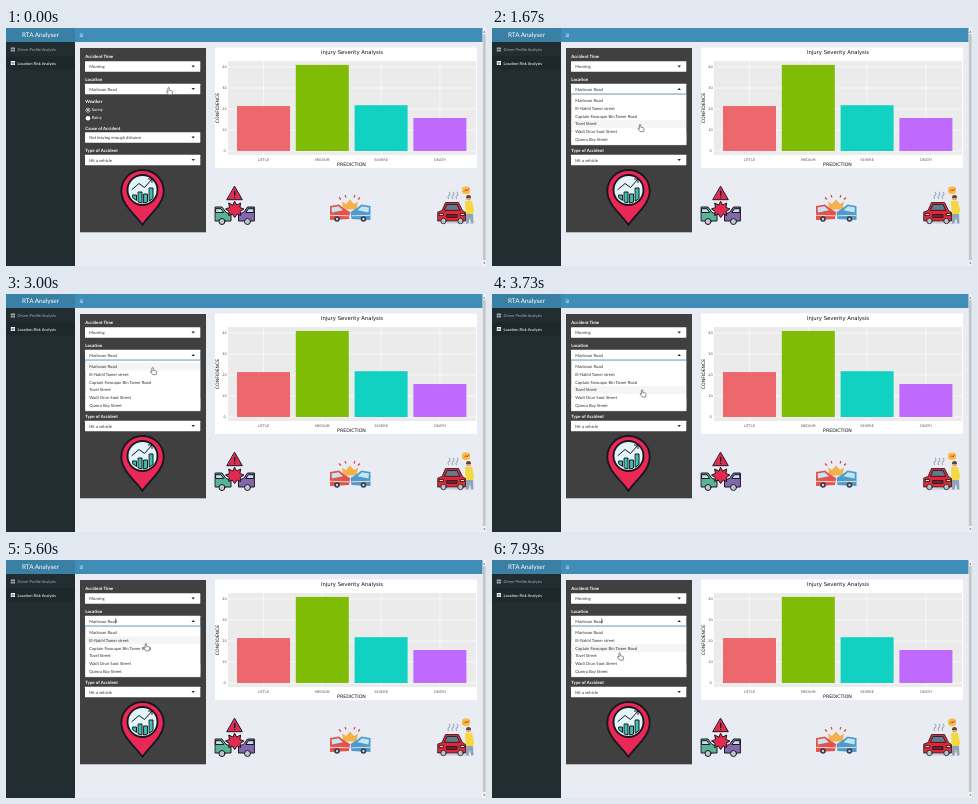
Write an HTML page that moves like this. It is 480 px wide and 238 px high and loops after 8000 ms.

```html
<!DOCTYPE html>
<html lang="en">
<head>
<meta charset="utf-8">
<title>RTA Analyser</title>
<style>
  html, body { margin: 0; width: 100%; height: 100%; overflow: hidden; background: #e9edf3; }
  svg { display: block; }
  text { font: 4.2px Lato, sans-serif; fill: #333; dominant-baseline: central; text-rendering: geometricPrecision; }
  .label { font-size: 4.4px; font-weight: bold; fill: #fff; }
  .side { font-size: 4px; }
  .chart text { font-family: "DejaVu Sans", sans-serif; text-anchor: middle; fill: #111; }
  .chart .tick { font-size: 3.5px; fill: #555; }
  .ink { stroke: #1a1720; stroke-width: 1; stroke-linejoin: round; stroke-linecap: round; }
  .bold { stroke-width: 1.9; }
</style>
</head>
<body>
<svg id="stage" width="480" height="238" viewBox="0 0 480 238">
  <!-- page frame -->
  <rect width="69" height="238" fill="#222d32"/>
  <rect width="69" height="14" fill="#3a80a5"/>
  <rect x="69" width="411" height="14" fill="#408eb8"/>
  <rect y="28" width="69" height="13.5" fill="#1e282c"/>
  <text x="34.5" y="7.2" text-anchor="middle" style="font-size:6.4px;fill:#fff">RTA Analyser</text>
  <path d="M73.800 6h3.200M73.800 7.300h3.200M73.800 8.600h3.200" stroke="#d5e6f0" stroke-width=".6"/>
  <path d="M4.800 19.500h4.200v4H4.800z" fill="#a3b2b8"/>
  <path d="M4.800 33h4.200v4H4.800z" fill="#fff"/>
  <path d="M4.800 21.500h4.200M6.900 20.200v3.300M4.800 35h4.200M6.900 33.700v3.300" stroke="#222d32" stroke-width=".5"/>
  <text class="side" x="11.500" y="21.700" style="fill:#a3b2b8">Driver Profile Analysis</text>
  <text class="side" x="11.500" y="35.100" style="fill:#fff">Location Risk Analysis</text>
  <rect x="476.500" width="3.500" height="238" fill="#f1f1f1"/>
  <rect x="476.800" y="6" width="2.900" height="226" fill="#c4c7ca"/>
  <path d="M477.300 4.500l1-1.500 1 1.500zM477.300 234.500l1 1.500 1-1.500z" fill="#555"/>

  <!-- form -->
  <rect x="74" y="20" width="126" height="184.300" fill="#404040"/>
  <g id="form"></g>
  <g fill="#fff">
    <circle cx="82" cy="82.300" r="2.300"/><circle cx="82" cy="90.300" r="2.300"/>
    <circle cx="82" cy="82.300" r="1.700" fill="#222"/><circle cx="82" cy="82.300" r="1" fill="#fff"/>
  </g>
  <text x="85.700" y="81.300" style="fill:#fff">Sunny</text>
  <text x="85.700" y="89.700" style="fill:#fff">Rainy</text>

  <g class="chart" id="chart"></g>

  <!-- map pin -->
  <path class="ink bold" d="M136.500 197C130 187 115.300 177 115.300 163a21.200 21 0 0 1 42.400 0c0 14-15 24-21.200 34z" fill="#ea2856"/>
  <circle class="ink bold" cx="136.500" cy="162" r="15" fill="#e4f4fb"/>
  <path class="ink" d="M127 167h3.500v5.500l-3.500-2.500zM132.500 164h3.500v11l-3.500-1zM138 166h3.500v8l-3.500 1zM143.500 160h3.500v10.500l-3.500 2.500z" fill="#36c4ae"/>
  <path class="ink" d="M126 161.500l7-6 5.500 4 7.500-8.500M142.500 151h3.500v3.500" fill="none"/>

  <!-- warning sign over two cars -->
  <g class="ink">
    <path d="M209.500 179h6.500l4 5.500 5 1.500v7h-15.500z" fill="#57b595"/>
    <path d="M248 179h-6.500l-4 5.500-5 1.500v7H248z" fill="#8468ad"/>
    <path d="M210 180.700h5l2.700 3.800H210zM247.500 180.700h-5l-2.700 3.800h7.700z" fill="#c8dfea"/>
    <path d="M228.700 173.500l2 3.500 4-2-.8 4.500 4 1.500-3.700 2.500.5 4-3.500-1.500-2.500 3.500-2.500-3.500-3.500 1.500.5-4-3.700-2.500 4-1.500-.8-4.500 4 2z" fill="#e22b50"/>
    <circle cx="216" cy="193.500" r="3" fill="#bfc6d2"/><circle cx="241.500" cy="193.500" r="3" fill="#bfc6d2"/>
    <path d="M228.700 158.500l7.600 13.200h-15.200z" fill="#e22b50"/>
    <path d="M228.700 163.500v3.700M228.700 169.400v.1" fill="none" style="stroke-width:1.400"/>
  </g>

  <!-- head-on crash -->
  <path d="M336 173.500l4 2.500 4-4.500 4 4.500 4-2.500-1.500 8h-13z" fill="#f5b04a"/>
  <path d="M333 169.500l2 2M339 167l1 2.500M354 169.500l-2 2M349 167l-1 2.500" stroke="#d9453f" stroke-width="1.200"/>
  <path d="M324 178l9-1.500 6 4.500 5 3-1 7-19 1z" fill="#e5514d"/>
  <path d="M364.500 178l-9-1.500-6 4.500-5 3 1 7 19 1z" fill="#4a9bd0"/>
  <path d="M325.500 179.500l7-1.200 4.500 4-11 2.200zM363 179.500l-7-1.200-4.500 4 11 2.200z" fill="#c3e4f1"/>
  <path d="M324 187.300l19 .5M364.500 187.300l-19 .5" stroke="#f3d8c8" stroke-width="1"/>
  <g fill="#353b4b"><circle cx="331" cy="191" r="2.800"/><circle cx="357.500" cy="191" r="2.800"/></g>
  <g fill="#c9d0da"><circle cx="331" cy="191" r="1.200"/><circle cx="357.500" cy="191" r="1.200"/></g>

  <!-- broken-down car with driver -->
  <path d="M443 171q-2-2 0-3.500t0-3.500M447 171q-2-2 0-3.500t0-3.500M451 171q-2-2 0-3.500t0-3.500" fill="none" stroke="#9aabb8" stroke-width="1.100"/>
  <path d="M431 195.500q17-3 36 0z" fill="#c3cad3"/>
  <rect x="456" y="158.500" width="8" height="7.500" rx="3" fill="#f5bf45"/>
  <path d="M458 163.500l2-2 1 1.500 2-2.500" stroke="#d24531" fill="none"/>
  <circle cx="462.500" cy="170" r="2.500" fill="#e3a577"/>
  <path d="M460 170q0-3 2.500-3t2.500 3z" fill="#5b4438"/>
  <path d="M459 173h7l2 9-1 5h-7.500z" fill="#f5d83f"/>
  <path d="M460 186h7l.5 9.500h-2.500l-1-6-1.500 6H460z" fill="#8fa3bb"/>
  <g class="ink" style="stroke-width:.8">
    <path d="M432 184l4-1.500 3.500-8h13l4 8 3 2v8.500H432z" fill="#dc2838"/>
    <path d="M438.500 182l2.500-5.500h10l2.700 5.500z" fill="#64798a"/>
    <path d="M441 186.500h10v3h-10z" fill="#7d1c2b"/>
    <path d="M433.500 185.500h4v2h-4zM454.500 185.500h4v2h-4z" fill="#f7dfa0"/>
    <circle cx="437.500" cy="193" r="2.700" fill="#bcc4cc"/><circle cx="454.500" cy="193" r="2.700" fill="#bcc4cc"/>
  </g>

  <!-- open list -->
  <g id="menu">
    <path d="M79 66h115.300" stroke="#3c8dbc" stroke-width=".8"/>
    <rect x="79.200" y="66.500" width="115" height="50.500" fill="#fff" stroke="#c8ccd2" stroke-width=".4"/>
    <rect id="hover" x="79.400" width="114.600" height="7.800" fill="#f5f5f5"/>
    <g id="items"></g>
  </g>
  <path id="caret" d="M109.700 58.300v5.200" stroke="#333" stroke-width=".6"/>

  <!-- pointers -->
  <g id="pointer">
    <path id="hand" d="M-1.600 .5V-3.200q.7-1.100 1.400 0v2.400l2.700.7q.7.300.600 1.200l-.5 2.600h-3.400l-2.200-2.900q.2-1 1.400-.8z" fill="#fff" stroke="#444" stroke-width=".6" stroke-linejoin="round"/>
    <path id="arrow" d="M-.5-3v6l1.400-1.300 1 2.300 1-.5-1-2.200h1.900z" fill="#111" stroke="#fff" stroke-width=".3"/>
    <path id="beam" d="M-1.300-3q1.300 0 1.300.7v4.600q0 .7-1.300.7M1.300-3q-1.300 0-1.300.7v4.600q0 .7 1.300.7" fill="none" stroke="#111" stroke-width=".7"/>
  </g>
</svg>
<script>
const $ = id => document.getElementById(id);
const LOOP = 8000, OPEN_AT = 70, ROW = 7.8, TOP = 68.6;
const places = ["Marlovan Road", "El-Nakhl Tamer street", "Captain Farouqan Bin Tamer Road",
  "Tovel Street", "Wadi Orun Soot Street", "Qumra Bay Street"];

const label = (y, s) => `<text class="label" x="79.3" y="${y}">${s}</text>`;
const field = (y, s, id = "") => `
  <rect x="79" y="${y - 5.2}" width="115.3" height="10.4" rx=".4" fill="#fff"/>
  <text x="83.2" y="${y}">${s}</text>
  <path ${id} d="M185.5 ${y - .9}h3.4l-1.7 1.9z" fill="#222"/>`;

$("form").innerHTML =
  label(28.5, "Accident Time") + field(38.5, "Morning") +
  label(51, "Location") + field(61, places[0], 'id="flip"') +
  label(73.2, "Weather") +
  label(100, "Cause of Accident") + field(109.5, "Not leaving enough distance") +
  label(122, "Type of Accident") + field(132, "Hit a vehicle");

$("items").innerHTML = places.map((s, i) =>
  `<text x="83.2" y="${TOP + ROW * (i + .5)}">${s}</text>`).join("");

const bars = [["LITTLE", 21.4, "#ec686c"], ["MEDIUM", 41, "#7fbc05"],
  ["SEVERE", 21.8, "#10d1c2"], ["DEATH", 15.7, "#c069ff"]];
const chartY = v => 123 - 2.1 * v;
const barMid = i => 257.5 + 58.8 * i;

$("chart").innerHTML = `
  <rect x="209" y="19.500" width="262" height="120.500" fill="#fff"/>
  <rect x="222" y="33" width="248" height="94" fill="#ebebeb"/>` +
  [0, 10, 20, 30, 40].map(v => `
    <path d="M222 ${chartY(v)}h248" stroke="#fff" stroke-width=".6"/>
    <text class="tick" x="218.500" y="${chartY(v)}">${v}</text>`).join("") +
  bars.map(([name, v, color], i) => `
    <path d="M${barMid(i)} 33v94" stroke="#fff" stroke-width=".6"/>
    <rect x="${barMid(i) - 26.5}" y="${chartY(v)}" width="53" height="${2.1 * v}" fill="${color}"/>
    <text class="tick" x="${barMid(i)}" y="131.500">${name}</text>`).join("") + `
  <text x="346" y="24.500" style="font-size:5.300px">Injury Severity Analysis</text>
  <text x="345.500" y="137.800" style="font-size:4.700px">PREDICTION</text>
  <text transform="translate(212.500 80) rotate(-90)" style="font-size:4.600px">CONFIDENCE</text>`;

// Pointer path: time, x, y
const path = [[0, 163.5, 63], [600, 163.5, 63], [790, 149, 100], [2730, 149, 100],
  [3000, 147.5, 77], [3200, 147.5, 77], [3700, 151, 99], [4050, 153, 112], [4270, 155, 121],
  [4870, 155, 121], [5270, 150, 100], [5670, 140, 86], [6100, 125, 98], [6530, 112, 72],
  [6750, 109, 65], [6900, 109, 65], [7400, 118, 84], [7900, 128.5, 96.5], [LOOP, 128.5, 96.5]];

function pointerAt(t) {
  const i = path.findIndex(p => p[0] > t);
  const [a, b] = [path[i - 1], path[i]];
  const k = (t - a[0]) / (b[0] - a[0]), e = k * k * (3 - 2 * k);
  return [a[1] + (b[1] - a[1]) * e, a[2] + (b[2] - a[2]) * e];
}

const show = (id, on) => $(id).style.display = on ? "" : "none";

function draw(now) {
  const t = now % LOOP, open = t >= OPEN_AT, [x, y] = pointerAt(t);
  const row = Math.max(0, Math.min(5, Math.floor((y - 5 - TOP) / ROW)));
  const blink = (t + 1050) % 1060 < 530;
  show("menu", open);
  show("caret", open && blink);
  $("flip").setAttribute("transform", open ? "rotate(180 187.2 61)" : "");
  $("hover").setAttribute("y", TOP + ROW * row);
  $("pointer").setAttribute("transform", `translate(${x} ${y})`);
  const beam = open && y < 67, arrow = y > 117;
  show("beam", beam);
  show("arrow", arrow);
  show("hand", !beam && !arrow);
  requestAnimationFrame(draw);
}
requestAnimationFrame(draw);
</script>
</body>
</html>
```
